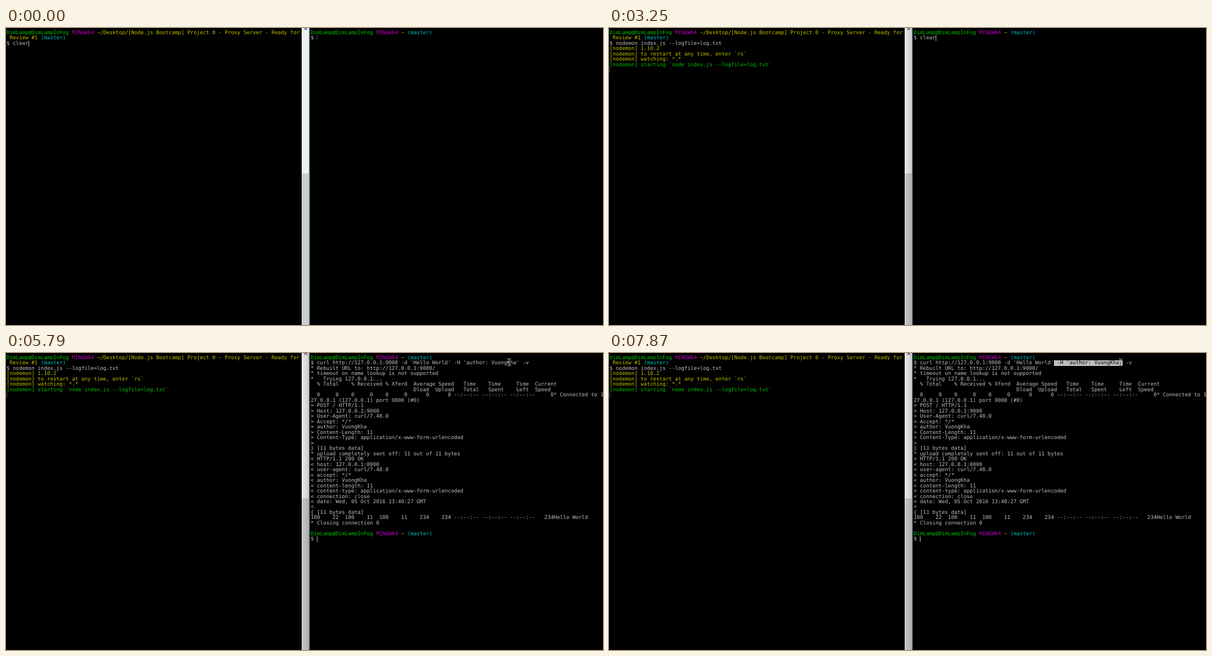
Animation, 1060 px wide and 528 px high, one loop 8000 ms. Source, as an HTML page:

```html
<!DOCTYPE html>
<html lang="en">
<head>
<meta charset="utf-8">
<title>Two terminals</title>
<style>
  html, body { margin: 0; width: 100%; height: 100%; overflow: hidden; background: #000; }
  svg { display: block; }
  text {
    font: 9.2px "DejaVu Sans Mono", "Noto Sans Mono", monospace;
    white-space: pre;
    text-rendering: geometricPrecision;
  }
  .invert { mix-blend-mode: difference; }
</style>
</head>
<body>
<svg id="stage" width="1060" height="528" viewBox="0 0 1060 528">
  <defs>
    <linearGradient id="fade">
      <stop offset="0" stop-opacity="0.02"/>
      <stop offset="1" stop-opacity="0.16"/>
    </linearGradient>
  </defs>
  <rect width="1060" height="528" fill="#000"/>
  <rect x="525" width="13.5" height="528" fill="#f0f0f0"/>
  <rect x="525.5" y="258.5" width="13" height="269.5" fill="#cdcdcd"/>
  <path d="M529.3 3.2L532 0.5L534.7 3.2" fill="none" stroke="#505050" stroke-width="1.4"/>
  <rect id="shadow" x="525" width="13.5" height="528" fill="url(#fade)"/>
  <rect id="edge" x="538.5" width="1" height="528"/>
</svg>
<script>
const LOOP = 8000;
const CW = 5.54, LH = 9.485, TOP = 3.8, BASE = 10.9;
const LEFT = 1, RIGHT = 541, COLS = 94;
const GREEN = '#00bf00', PURPLE = '#bf00bf', YELLOW = '#bfbf00', CYAN = '#00bfbf', GREY = '#bfbfbf';
const USER = 'DimLamp@DimLampInFog';
const AUTHOR = 'VuongKha';
const OFF = 0, ON = 1, DIM = 2;

const stage = document.getElementById('stage');
const shadow = document.getElementById('shadow');
const edge = document.getElementById('edge');

function make(tag, attrs, parent = stage) {
  const el = document.createElementNS('http://www.w3.org/2000/svg', tag);
  for (const key in attrs) el.setAttribute(key, attrs[key]);
  parent.appendChild(el);
  return el;
}

const group = () => make('g', {});
const show = (el, on) => el.setAttribute('visibility', on ? 'visible' : 'hidden');
const rowTop = row => Math.round(TOP + row * LH);

function print(parent, left, col, row, str, fill = GREY) {
  const el = make('text', { x: left + col * CW, y: BASE + row * LH, fill }, parent);
  el.textContent = str;
  return el;
}

// Prints [text, colour] pieces one after another on a row.
function printRow(parent, left, row, pieces) {
  let col = 0;
  for (const [str, fill] of pieces) {
    print(parent, left, col, row, str, fill);
    col += str.length;
  }
}

const prompt = path => [[USER + ' ', GREEN], ['MINGW64 ', PURPLE], [path, YELLOW]];
const homePrompt = [...prompt('~ '), ['(master)', CYAN]];

const serve = 'nodemon index.js --logfile=log.txt';
const request = `curl http://127.0.0.1:9000 -d 'Hello World' -H 'author: ${AUTHOR}' -v`;

const base = group();
printRow(base, LEFT, 0, prompt('~/Desktop/[Node.js Bootcamp] Project 0 - Proxy Server - Ready for'));
printRow(base, LEFT, 1, [[' Review #1 ', YELLOW], ['(master)', CYAN]]);
print(base, LEFT, 0, 2, '$');
printRow(base, RIGHT, 0, homePrompt);
print(base, RIGHT, 0, 1, '$');
const leftInput = print(base, LEFT, 2, 2, '');
const rightInput = print(base, RIGHT, 2, 1, '');

const banner = group();
['1.10.2', 'to restart at any time, enter `rs`', 'watching: *.*'].forEach((line, i) =>
  print(banner, LEFT, 0, 3 + i, '[nodemon] ' + line, YELLOW));
const starting = group();
print(starting, LEFT, 0, 6, `[nodemon] starting \`node ${serve.slice(8)}\``, GREEN);

const reply = group();
`* Rebuilt URL to: http://127.0.0.1:9000/
* timeout on name lookup is not supported
*   Trying 127.0.0.1...
  % Total    % Received % Xferd  Average Speed   Time    Time     Time  Current
                                 Dload  Upload   Total   Spent    Left  Speed
  0     0    0     0    0     0      0      0 --:--:-- --:--:-- --:--:--     0* Connected to 1
27.0.0.1 (127.0.0.1) port 9000 (#0)
> POST / HTTP/1.1
> Host: 127.0.0.1:9000
> User-Agent: curl/7.48.0
> Accept: */*
> author: ${AUTHOR}
> Content-Length: 11
> Content-Type: application/x-www-form-urlencoded
>
} [11 bytes data]
* upload completely sent off: 11 out of 11 bytes
< HTTP/1.1 200 OK
< host: 127.0.0.1:8000
< user-agent: curl/7.48.0
< accept: */*
< author: ${AUTHOR}
< content-length: 11
< content-type: application/x-www-form-urlencoded
< connection: close
< date: Wed, 05 Oct 2016 13:40:27 GMT
<
{ [11 bytes data]
100    22  100    11  100    11    234    234 --:--:-- --:--:-- --:--:--   234Hello World
* Closing connection 0`.split('\n').forEach((line, i) => print(reply, RIGHT, 0, 2 + i, line));
printRow(reply, RIGHT, 33, homePrompt);
print(reply, RIGHT, 0, 34, '$');

const selection = make('path', { fill: GREY, class: 'invert' });
const caretLine = () => make('path', { fill: 'none' });
const leftCaret = caretLine(), rightCaret = caretLine();
const pointer = make('path', {
  d: 'M-3 -6H-1M1 -6H3M0 -5.5V5.5M-3 6H-1M1 6H3',
  fill: 'none', stroke: '#fff', class: 'invert'
});

// Caret tracks: time, column, row, state.
const leftTrack = [
  [0, 7, 2, ON], [130, 36, 2, ON], [690, 36, 2, OFF], [1220, 36, 2, ON],
  [1350, 0, 3, ON], [1750, 0, 3, OFF], [2140, 0, 7, ON], [2440, 0, 7, OFF], [2590, 0, 7, DIM]
];
const rightTrack = [
  [0, 2, 1, DIM], [2720, 2, 1, ON], [3250, 7, 1, ON], [3660, 70, 1, ON], [4190, 70, 1, OFF],
  [4610, 0, 2, ON], [4740, 2, 34, ON]
];
[5270, 5790, 6310, 6830, 7350, 7870].forEach((t, i) => rightTrack.push([t, 2, 34, i % 2 ? ON : OFF]));

// Pointer track: time, x, y; no place means hidden.
const pointerTrack = [
  [0], [1880, 201, 56], [2140, 201, 63], [2290, 396, 87], [2440, 627, 89],
  [2590, 616, 49], [3250],
  [5400, 897, 40], [5530, 896, 27], [5660, 894, 19], [5790, 893, 16],
  [5920, 866, 17], [6050, 828, 17], [6180, 800, 17], [6310, 791, 17],
  [6440, 797, 17], [6570, 812, 16], [6700, 830, 15], [6830, 849, 14], [6960, 867, 13],
  [7090, 877, 13], [7220, 885, 11], [7350, 895, 13], [7480, 903, 15], [7610, 908, 16]
];

// Selection track: time, end column, row.
const SEL_START = 45;
const selectionTrack = [
  [0, SEL_START, 1], [6440, 46, 1], [6570, 48, 1], [6700, 50, 1], [6830, 53, 1], [6960, 56, 1],
  [7090, 59, 1], [7220, 62, 0], [7350, 63, 1], [7480, 65, 1], [7610, 67, 1]
];

function at(track, t) {
  let i = track.length - 1;
  while (track[i][0] > t) i--;
  return track[i];
}

function drawCaret(el, left, [, col, row, state]) {
  show(el, state !== OFF);
  el.setAttribute('d', `M${Math.round(left + col * CW) + 0.5} ${rowTop(row)}v10`);
  el.setAttribute('stroke', state === DIM ? '#8c8c8c' : GREY);
  el.setAttribute('stroke-dasharray', state === DIM ? '1 1' : 'none');
}

function bar(from, to, row) {
  const x = Math.round(RIGHT + from * CW);
  const end = Math.min(1060, Math.round(RIGHT + to * CW));
  return `M${x} ${rowTop(row)}H${end}v10H${x}z`;
}

function drawSelection([, end, row]) {
  selection.setAttribute('d', row === 1
    ? bar(SEL_START, end, 1)
    : bar(end, COLS, 0) + bar(0, SEL_START, 1));
}

function drawPointer([, x, y]) {
  show(pointer, x !== undefined);
  if (x !== undefined) pointer.setAttribute('transform', `translate(${x + 0.5} ${y + 0.5})`);
}

function draw(t) {
  leftInput.textContent = t < 130 ? 'clear' : serve;
  rightInput.textContent = t < 3250 ? '' : t < 3660 ? 'clear' : request;
  show(banner, t >= 2010);
  show(starting, t >= 2140);
  show(reply, t >= 4740);
  shadow.setAttribute('opacity', t < 2590 ? 0 : t < 2720 ? 0.5 : 1);
  edge.setAttribute('fill', t < 2590 ? '#2f7fa8' : '#24506e');
  drawCaret(leftCaret, LEFT, at(leftTrack, t));
  drawCaret(rightCaret, RIGHT, at(rightTrack, t));
  drawSelection(at(selectionTrack, t));
  drawPointer(at(pointerTrack, t));
}

const start = performance.now();
function tick() {
  draw((performance.now() - start) % LOOP);
  requestAnimationFrame(tick);
}
tick();
</script>
</body>
</html>
```
